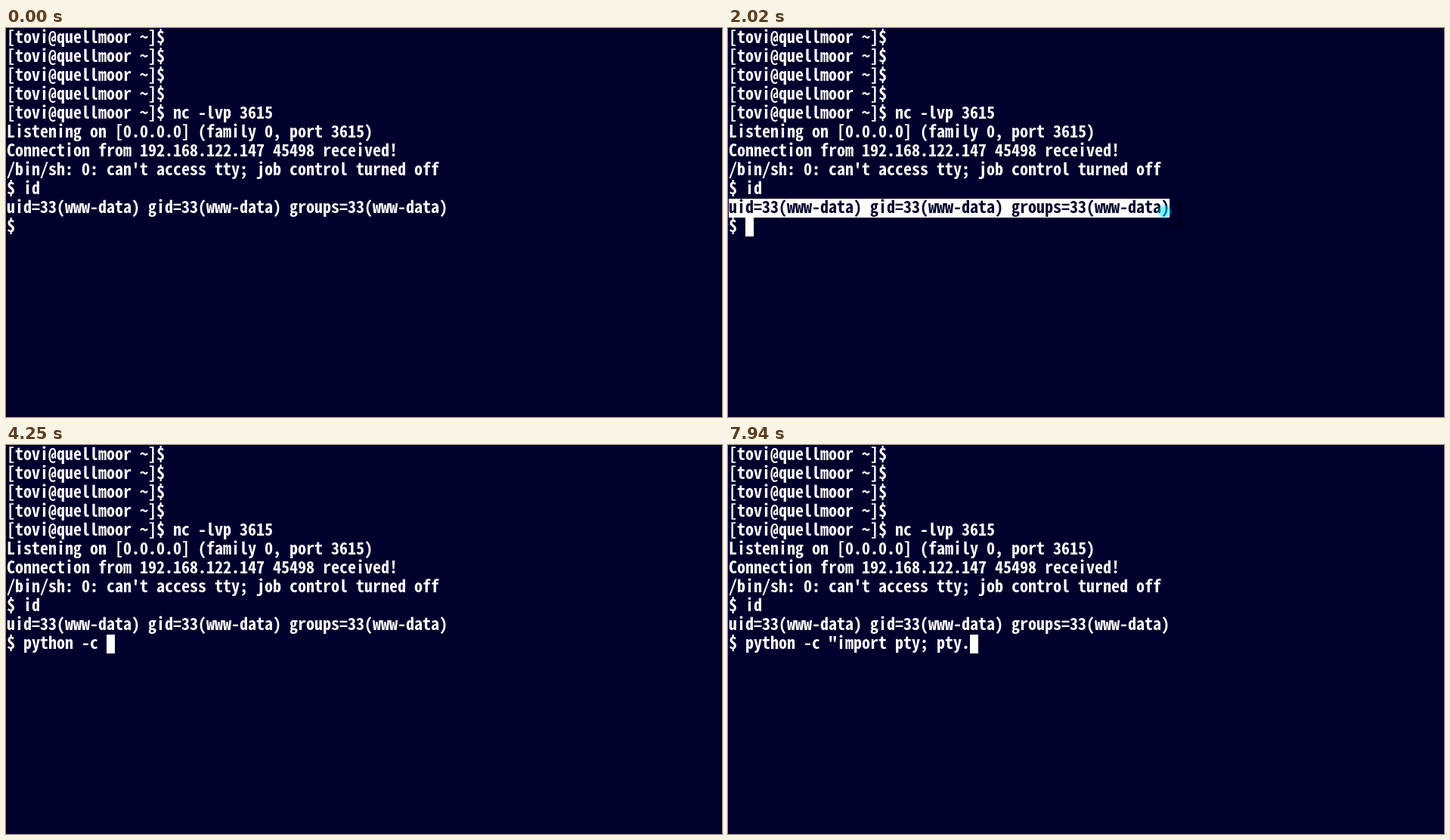
These frames come from a looping animation (947x515 px, 8000 ms). An HTML page:

```html
<!DOCTYPE html>
<html lang="en">
<head>
<meta charset="utf-8">
<title>Terminal session</title>
<style>
  html, body { margin: 0; width: 100%; height: 100%; overflow: hidden; background: #00002d; }
  svg { display: block; width: 947px; height: 515px; }
  text {
    font-family: "Noto Sans Mono CJK JP", "Noto Sans Mono CJK SC", "Noto Sans Mono", "DejaVu Sans Mono", monospace;
    font-weight: 700;
    white-space: pre;
    font-variant-ligatures: none;
  }
</style>
</head>
<body>
<svg viewBox="0 0 947 515">
  <defs>
    <radialGradient id="glow">
      <stop offset="0" stop-color="#00e5ff" stop-opacity=".6"/>
      <stop offset=".7" stop-color="#00f0ff" stop-opacity=".45"/>
      <stop offset="1" stop-color="#00f0ff" stop-opacity="0"/>
    </radialGradient>
    <clipPath id="selClip"><rect id="clipBox" x="1" y="226" height="25"/></clipPath>
  </defs>
  <rect width="947" height="515" fill="#00002d"/>
  <g id="rows" fill="#fff"></g>
  <rect id="sel" x="1" y="226" height="25" fill="#fff"/>
  <g id="selText" fill="#00002d" clip-path="url(#selClip)"></g>
  <rect id="cursor" y="251" width="11" height="25" fill="#fff"/>
  <g id="pointer" fill="none" stroke="#000">
    <path d="M19-17V19H-9" stroke-width="1.5" stroke-opacity=".6"/>
    <path d="M20.5-15V20" stroke-width="4" stroke-opacity=".2"/>
    <circle r="10" fill="url(#glow)" stroke="none"/>
  </g>
</svg>
<script>
const LOOP = 8000, CELL = 11, LINE = 25;
const byId = id => document.getElementById(id);
const prompt = "[tovi@quellmoor ~]$ ";
const lines = [
  prompt, prompt, prompt, prompt,
  prompt + "nc -lvp 3615",
  "Listening on [0.0.0.0] (family 0, port 3615)",
  "Connection from 192.168.122.147 45498 received!",
  "/bin/sh: 0: can't access tty; job control turned off",
  "$ id",
  "uid=33(www-data) gid=33(www-data) groups=33(www-data)",
  "$ "
];
const command = 'python -c "import pty; pty.';
// One key time per typed character.
const keys = [
  2980, 3260, 3360, 3470, 3470, 3580, 3850, 4070, 4160, 4250, 5050,
  5740, 5930, 6110, 6200, 6200, 6290, 6370, 6550, 6680, 6810,
  7080, 7210, 7340, 7480, 7640, 7940
];
// Times at which the cursor toggles; it starts hidden.
const blinks = [480, 1030, 1570, 2100, 2640, 4790, 5010, 5640, 5740];
// Time, x, y of the click highlight.
const path = [
  [840, 12, 238], [980, 95, 238], [1120, 290, 241], [1220, 425, 244],
  [1310, 504, 246], [1420, 544, 247], [1640, 562, 247], [1800, 577.5, 243],
  [2110, 577.5, 243], [2400, 563, 296], [2690, 560, 297]
];
// Time and selected width in cells.
const drag = [[840, 0], [960, 10], [1080, 30], [1200, 47], [1290, 52], [1670, 52], [1720, 53], [2450, 53]];

// Fit the font so that one glyph is one cell wide.
const ctx = document.createElement("canvas").getContext("2d");

function addLine(parent, str, row) {
  const el = document.createElementNS("http://www.w3.org/2000/svg", "text");
  el.setAttribute("x", 1);
  el.setAttribute("y", 20 + LINE * row);
  el.textContent = str;
  parent.appendChild(el);
  return el;
}

const rowEls = lines.map((str, row) => addLine(byId("rows"), str, row));
const input = rowEls[10];
addLine(byId("selText"), lines[9], 9);

ctx.font = "700 100px " + getComputedStyle(input).fontFamily;
const size = CELL * 100 / ctx.measureText("m").width;
document.querySelectorAll("text").forEach(el => el.style.fontSize = size + "px");

function along(points, t) {
  let i = 1;
  while (i < points.length - 1 && t > points[i][0]) i++;
  const a = points[i - 1], b = points[i];
  const k = Math.min(1, Math.max(0, (t - a[0]) / (b[0] - a[0])));
  return a.slice(1).map((v, n) => v + (b[n + 1] - v) * k);
}

const passed = (times, t) => times.filter(v => v <= t).length;

function draw(t) {
  const typed = passed(keys, t);
  input.textContent = "$ " + command.slice(0, typed);
  byId("cursor").setAttribute("x", 1 + CELL * (2 + typed));
  byId("cursor").style.display = passed(blinks, t) % 2 ? "" : "none";

  // The mouse moves in steps of 47 ms.
  const step = 840 + 47 * Math.floor((t - 840) / 47);
  const cells = t < 840 || t >= 2450 ? 0 : Math.floor(along(drag, step)[0]);
  for (const id of ["sel", "clipBox"]) byId(id).setAttribute("width", cells * CELL);

  const pointer = byId("pointer");
  pointer.style.display = t >= 840 && t < 2690 ? "" : "none";
  pointer.setAttribute("transform", `translate(${along(path, step)})`);
  pointer.setAttribute("opacity", Math.min(1, Math.max(0, (2690 - step) / 200)));
}

const start = performance.now();
function tick() {
  draw((performance.now() - start) % LOOP);
  requestAnimationFrame(tick);
}
draw(0);
requestAnimationFrame(tick);
</script>
</body>
</html>
```
